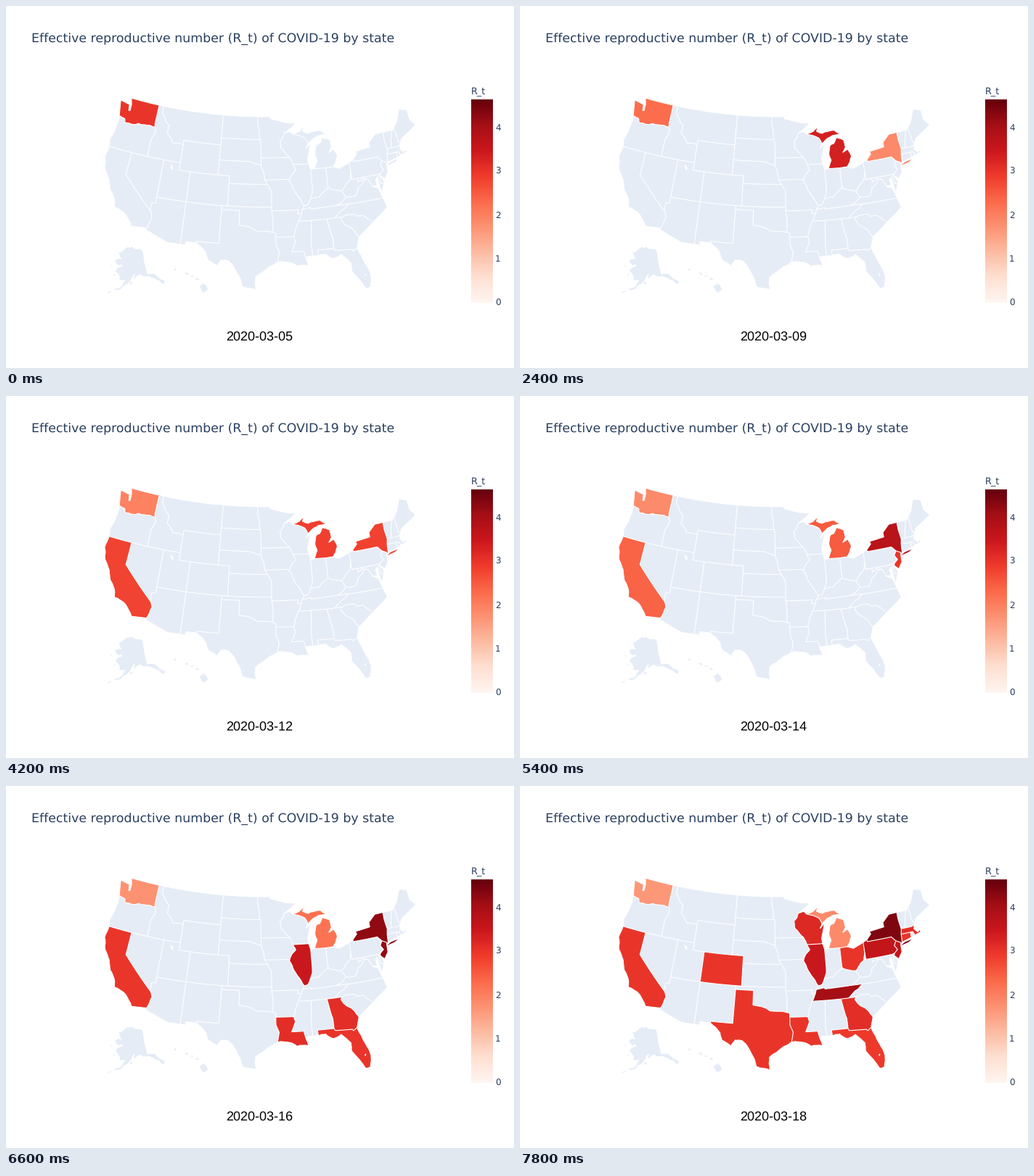
These frames come from a looping animation (700x500 px, 8 s). A matplotlib script:

```python
import random

import numpy as np
import matplotlib.pyplot as plt
from matplotlib.animation import FuncAnimation
from matplotlib.collections import LineCollection
from matplotlib.patches import Polygon

W, H, DPI = 700, 500, 100
PX = 72 / DPI
LAND, INK = "#E5ECF6", "#2a3f5f"
VMAX = 4.63
SCALE = 594
REDS = plt.get_cmap("Reds")
rng = random.Random(7)
plt.rcParams["text.hinting"] = "no_hinting"


def conic(meridian, center, parallels, scale, origin):
    """Albers equal-area projection to stage pixels; longitudes are degrees west."""
    s1, s2 = np.sin(np.radians(parallels))
    n = (s1 + s2) / 2
    c = 1 + s1 * s2

    def raw(lon, lat):
        rho = np.sqrt(c - 2 * n * np.sin(np.radians(lat))) / n
        turn = n * np.radians(meridian - lon)
        return np.array([rho * np.sin(turn), rho * np.cos(turn)])

    base = raw(*center)[:, None]
    start = np.array(origin)[:, None]
    return lambda lon, lat: (start + scale * (raw(lon, lat) - base)).T


MAIN = conic(96, (96.6, 38.7), (29.5, 45.5), SCALE, (350, 260))
ALASKA = conic(154, (156, 58.5), (55, 65), 0.35 * SCALE,
               (350 - 0.307 * SCALE, 260 + 0.201 * SCALE))
HAWAII = conic(157, (160, 19.9), (8, 18), SCALE,
               (350 - 0.205 * SCALE, 260 + 0.212 * SCALE))


def place(points, proj=MAIN, steps=6):
    """Project a path, subdividing so parallels come out curved."""
    p = np.array(points, float)
    t = np.arange((len(p) - 1) * steps + 1) / steps
    k = np.arange(len(p))
    return proj(np.interp(t, k, p[:, 0]), np.interp(t, k, p[:, 1]))


def wander(points, depth=2, amount=0.07):
    """Roughen a path by shifting the middle of each stretch sideways."""
    for _ in range(depth):
        out = points[:1]
        for (x0, y0), (x1, y1) in zip(points, points[1:]):
            d = rng.uniform(-amount, amount)
            out += [((x0 + x1) / 2 + d * (y1 - y0), (y0 + y1) / 2 - d * (x1 - x0)), (x1, y1)]
        points = out
    return points


arcs = []


def line(*v):
    """Surveyed border through the given lon, lat pairs."""
    arcs.append(list(zip(v[::2], v[1::2])))
    return arcs[-1]


def shore(*v):
    """River or coast through the given lon, lat pairs."""
    arcs.append(wander(list(zip(v[::2], v[1::2]))))
    return arcs[-1]


def ring(*parts):
    """Join arcs end to end, flipping those that run the other way."""
    pts = list(parts[0])
    if pts[-1] not in (parts[1][0], parts[1][-1]):
        pts.reverse()
    for part in parts[1:]:
        pts += part if part[0] == pts[-1] else part[::-1]
    return place(pts)


# Outer border, clockwise from the south-west
ca_coast = shore(117.12, 32.53, 118.4, 33.85, 120.5, 34.45, 120.65, 35.1, 121.9, 36.5,
                 122.5, 37.7, 123.75, 38.95, 124.4, 40.4, 124.21, 42)
or_coast = shore(124.21, 42, 124.5, 42.8, 123.95, 45.5, 124.07, 46.28)
wa_coast = line(124.07, 46.28, 124.7, 48.35, 122.8, 48.1, 122.6, 47.3, 122.35, 47.35,
                122.4, 48.2, 122.76, 49)
wa_north = line(122.76, 49, 117.03, 49)
north = line(117.03, 49, 97.23, 49)
mn_north = line(97.23, 49, 95.15, 49, 95.15, 49.38, 94.65, 48.74, 91.4, 48.1,
                89.6, 48, 90.8, 47.3, 92.02, 46.71)
wi_north = line(92.02, 46.71, 90.9, 46.95, 90.42, 46.57)
mi_upper = shore(90.42, 46.57, 87.9, 47.45, 88.45, 46.85, 87.4, 46.5, 85, 46.75,
                 83.95, 46.05, 85.5, 46.08, 86.65, 45.7, 87.6, 45.1)
wi_lake = line(87.6, 45.1, 88, 44.55, 87.1, 45.2, 87.9, 43.2, 87.8, 42.49)
il_lake = line(87.8, 42.49, 87.53, 41.71)
in_lake = line(87.53, 41.71, 86.82, 41.76)
mi_lake = shore(86.82, 41.76, 86.2, 42.8, 86.5, 43.7, 86.1, 44.8, 85.4, 45, 84.75, 45.77,
                83.45, 45.3, 83.3, 44.3, 83.9, 43.7, 82.95, 44.05, 82.45, 43, 83.45, 41.73)
oh_lake = line(83.45, 41.73, 82.4, 41.4, 80.52, 41.98)
pa_lake = line(80.52, 41.98, 79.76, 42.27)
ny_north = line(79.76, 42.27, 78.9, 42.9, 79.05, 43.27, 76.3, 43.5, 76.3, 44.1,
                74.9, 45, 73.34, 45.01)
new_england = line(73.34, 45.01, 71.5, 45.01, 71.08, 45.3, 70.3, 45.9, 69.2, 47.45,
                   67.79, 47.07, 67.79, 45.7, 66.97, 44.8, 70.2, 43.6, 70.82, 42.87)
ma_coast = line(70.82, 42.87, 71, 42.3, 70.5, 41.8, 70.1, 42.05, 69.95, 41.7, 71.12, 41.5)
ri_coast = line(71.12, 41.5, 71.86, 41.32)
ct_coast = line(71.86, 41.32, 73.66, 41)
harbor = line(73.66, 41, 74, 40.7)
nj_coast = line(74, 40.7, 74.1, 39.75, 74.9, 38.95, 75.55, 39.5)
atlantic = line(75.55, 39.5, 75.1, 38.6, 75.95, 37.15, 76.1, 39.4, 76.5, 39.1, 76.4, 38.3,
                77.25, 38.35, 76.3, 37.9, 76, 36.9, 75.5, 35.25, 76.5, 34.65,
                77.95, 33.87, 80.9, 32.04)
ga_coast = line(80.9, 32.04, 81.44, 30.71)
fl_coast = shore(81.44, 30.71, 80.55, 28.4, 80.03, 26.8, 80.4, 25.2, 81.1, 25.13,
                 82.75, 27.7, 82.7, 28.8, 84, 30.1, 85.2, 29.65, 86.4, 30.38, 87.52, 30.28)
gulf = shore(87.52, 30.28, 89.52, 30.18)
la_coast = shore(89.52, 30.18, 89.1, 29, 90.9, 29.05, 92, 29.6, 93.84, 29.7)
tx_coast = shore(93.84, 29.7, 95.1, 29.1, 97.2, 27.7, 97.14, 25.97)
rio = shore(97.14, 25.97, 99.1, 26.42, 99.5, 27.5, 101.4, 29.77, 102.5, 29.8,
            103.1, 28.98, 104.5, 29.65, 104.9, 30.6, 106.53, 31.78)
mexico = line(106.53, 31.78, 108.21, 31.78, 108.21, 31.33, 111.07, 31.33,
              114.81, 32.5, 114.72, 32.72)
ca_south = line(114.72, 32.72, 117.12, 32.53)
outline = list(arcs)

# Borders that follow a parallel or a meridian
for lat, west, east in [(42, 120, 111.05), (45, 111.05, 104.05), (41, 111.05, 109.05),
                        (45.94, 104.05, 96.56), (43.5, 96.45, 91.22), (40, 102.05, 95.31),
                        (37, 114.05, 109.05), (37, 102.04, 94.62), (36.56, 81.68, 75.87)]:
    line(west, lat, east, lat)
for lon, top, low in [(111.05, 45, 41), (109.05, 37, 31.33), (104.05, 49, 41), (103, 37, 36.5)]:
    line(lon, top, lon, low)

# West and plains
wa_or = shore(124.07, 46.28, 122.9, 46.1, 122.6, 45.6, 121.2, 45.65, 119, 46, 116.92, 46)
wa_id = line(116.92, 46, 117.04, 46.4, 117.03, 49)
shore(116.92, 46, 116.6, 45.5, 117.1, 44.3, 117.03, 42)
shore(116.05, 49, 116.05, 48, 114.35, 46.65, 114.4, 45.56, 113, 44.4, 111.05, 44.47)
line(114.04, 42, 114.05, 36.2, 114.7, 36.1, 114.63, 35)
ca_or = line(124.21, 42, 120, 42)
ca_nv = line(120, 42, 120, 39, 114.63, 35)
ca_az = shore(114.63, 35, 114.2, 34.3, 114.5, 33.2, 114.72, 32.72)
shore(97.23, 49, 96.8, 46.9, 96.5, 45.5)
line(96.5, 45.5, 96.45, 43.5, 96.44, 42.49)
line(104.05, 43, 98.5, 43, 96.44, 42.49)
shore(96.44, 42.49, 95.77, 40.58, 94.61, 39.11)
co_ut = line(109.05, 37, 109.05, 41)
co_wy = line(109.05, 41, 104.05, 41)
co_ne = line(104.05, 41, 102.05, 41, 102.05, 40)
co_ks = line(102.05, 40, 102.04, 37)
co_nm = line(102.04, 37, 109.05, 37)
nm_tx = line(103, 36.5, 103.06, 32, 106.62, 32, 106.53, 31.78)
ok_panhandle = line(103, 36.5, 100, 36.5, 100, 34.56)
red_river = shore(100, 34.56, 97.2, 33.85, 94.48, 33.64)
tx_ar = line(94.48, 33.64, 94.05, 33.55, 94.04, 33.02)
tx_la = line(94.04, 33.02, 94.04, 31.99, 93.55, 31, 93.84, 29.7)

# Mississippi basin
ar_la = line(94.04, 33.02, 91.17, 33)
la_ms = line(91.17, 33, 90.95, 32.3, 91.6, 31, 89.73, 31, 89.52, 30.18)
shore(91.17, 33, 90.3, 35)
ar_tn = shore(90.3, 35, 89.7, 36)
line(89.7, 36, 90.37, 36, 90.15, 36.5, 94.62, 36.5, 94.43, 35.4, 94.48, 33.64)
line(94.61, 39.11, 94.62, 36.5)
mo_tn = line(89.7, 36, 89.53, 36.5)
line(89.53, 36.5, 89.13, 36.98)
mo_il = shore(89.13, 36.98, 90.2, 38.4, 90.7, 39.1, 91.42, 40.38)
line(95.77, 40.58, 91.73, 40.61, 91.42, 40.38)
il_ia = shore(91.42, 40.38, 91, 41.2, 90.2, 41.8, 90.64, 42.51)
il_wi = line(90.64, 42.51, 87.8, 42.49)
ia_wi = shore(90.64, 42.51, 91.22, 43.5)
mn_wi = shore(91.22, 43.5, 92.75, 44.75, 92.87, 45.7, 92.29, 46.1, 92.02, 46.71)
wi_mi = shore(90.42, 46.57, 88.1, 45.92, 87.6, 45.1)
il_in = line(87.53, 41.71, 87.53, 39.35, 87.6, 38.6, 88.05, 37.8)
il_ky = shore(88.05, 37.8, 88.5, 37.1, 89.13, 36.98)
shore(88.05, 37.8, 86.5, 37.95, 85.4, 38.73, 84.82, 39.1)
in_oh = line(84.82, 39.1, 84.81, 41.7)
mi_oh = line(83.45, 41.73, 84.81, 41.7)
mi_in = line(84.81, 41.7, 86.82, 41.76)
oh_ky = shore(84.82, 39.1, 83.7, 38.65, 82.59, 38.42)
oh_wv = shore(82.59, 38.42, 81.75, 39.1, 80.85, 39.7, 80.52, 40.64)
oh_pa = line(80.52, 40.64, 80.52, 41.98)

# South-east
shore(82.59, 38.42, 81.97, 37.54, 83.68, 36.6)
tn_ky = line(83.68, 36.6, 88.07, 36.5, 88.07, 36.68, 89.53, 36.5)
tn_va = line(83.68, 36.6, 81.68, 36.59)
tn_nc = shore(81.68, 36.59, 82.6, 36, 84.32, 34.99)
tn_ga = line(84.32, 34.99, 85.6, 34.98)
tn_south = line(85.6, 34.98, 90.3, 35)
nc_ga = line(84.32, 34.99, 83.11, 35)
line(83.11, 35, 82.3, 35.2, 81.05, 35.15, 80.78, 34.82, 79.67, 34.8, 78.55, 33.86)
sc_ga = shore(83.11, 35, 83.35, 34.7, 81.5, 33, 80.9, 32.04)
ga_fl = line(81.44, 30.71, 82.05, 30.36, 82.2, 30.57, 84.86, 30.7, 85, 31)
fl_al = line(85, 31, 87.6, 31, 87.52, 30.28)
ga_al = line(85, 31, 85, 32.3, 85.18, 32.87, 85.6, 34.98)
line(88.2, 35, 88.47, 31.9, 88.4, 30.37)

# Atlantic and New England
pa_wv = line(79.48, 39.72, 80.52, 39.72, 80.52, 40.64)
pa_md = line(75.79, 39.72, 79.48, 39.72)
pa_de = line(75.42, 39.8, 75.79, 39.72)
nj_de = line(75.55, 39.5, 75.42, 39.8)
nj_pa = line(75.42, 39.8, 74.75, 40.2, 75.15, 40.8, 74.69, 41.36)
ny_nj = line(74, 40.7, 73.9, 41, 74.69, 41.36)
ny_pa = line(74.69, 41.36, 75.35, 42, 79.76, 42, 79.76, 42.27)
ny_vt = line(73.34, 45.01, 73.4, 44, 73.26, 42.75)
ny_ma = line(73.26, 42.75, 73.5, 42.05)
ny_ct = line(73.5, 42.05, 73.66, 41)
ma_north = line(70.82, 42.87, 71.3, 42.7, 73.26, 42.75)
ma_ri = line(71.12, 41.5, 71.38, 42.02, 71.8, 42.02)
ma_ct = line(71.8, 42.02, 73.5, 42.05)
ct_ri = line(71.8, 42.02, 71.86, 41.32)
shore(71.5, 45.01, 72.05, 44.1, 72.46, 42.73)
line(71.08, 45.3, 70.95, 43.35, 70.7, 43.07)
line(75.79, 39.72, 75.7, 38.46, 75.05, 38.45)
shore(77.25, 38.35, 77.72, 39.32, 78.6, 39.6, 79.48, 39.2, 79.48, 39.72)
shore(77.72, 39.32, 78.35, 39.4, 79.65, 38.5, 80.3, 37.5, 81.97, 37.54)

fig = plt.figure(figsize=(W / DPI, H / DPI), dpi=DPI, facecolor="white")
ax = fig.add_axes([0, 0, 1, 1])
ax.axis("off")


def fill(xy, color=LAND, z=1):
    return ax.add_patch(Polygon(xy, facecolor=color, linewidth=0, zorder=z))


def blob(lon, lat, dx, dy, proj=MAIN, tilt=0.0, color=LAND, z=1):
    """Small island or lake: a roughened, slanted diamond."""
    turns = np.arange(5) * np.pi / 2
    pts = [(lon + dx * np.cos(a), lat + dy * np.sin(a) + tilt * np.cos(a)) for a in turns]
    return fill(place(wander(pts, 2, 0.2), proj), color, z)


fill(ring(*outline))
long_island = place([(74, 40.6), (73.2, 40.92), (71.9, 41.07), (72.5, 40.82), (74, 40.6)])
fill(long_island)

alaska = [(141, 69.65), (148, 70.4), (156.6, 71.35), (166.2, 68.88), (161.8, 66.3),
          (168, 65.65), (166, 64.5), (161.2, 64.5), (161, 63.6), (164.5, 63.1), (166, 61.7),
          (162, 59.9), (161.9, 58.65), (157.4, 58.7), (160.5, 56), (164.8, 54.65),
          (156.5, 57.2), (151.8, 60.8), (150.2, 61.2), (151.7, 59.3), (146.5, 60.8),
          (139.8, 59.55), (136.5, 58.2), (131.5, 55), (130.1, 56.1), (135.5, 59.8),
          (139.1, 60.3), (141, 60.3), (141, 69.65)]
fill(place(wander(alaska, 2, 0.1), ALASKA))
for lon, lat, dx, dy, tilt in [(153.4, 57.6, 1, 0.5, -0.4), (167.5, 53.3, 1.3, 0.2, -0.5),
                               (166.5, 60.1, 0.8, 0.3, 0), (170.3, 63.4, 1.4, 0.2, 0)]:
    blob(lon, lat, dx, dy, ALASKA, tilt)
for lon, lat, dx, dy, tilt in [(155.5, 19.6, 0.6, 0.65, 0.1), (156.4, 20.8, 0.35, 0.15, 0.1),
                               (157.05, 21.13, 0.3, 0.07, 0), (157.95, 21.5, 0.3, 0.15, 0.1),
                               (159.55, 22.05, 0.22, 0.18, 0)]:
    blob(lon, lat, dx, dy, HAWAII, tilt)

# Each state: its shapes and a rule for R_t by day, or None before the first case count
tracks = []


def track(rule, *shapes):
    tracks.append((rule, [fill(s, z=2) for s in shapes]))


def keys(*pairs):
    """Straight runs between (day, value) pairs, starting on the first day."""
    days, values = zip(*pairs)
    return lambda day: np.interp(day, days, values) if day >= days[0] else None


def fresh(start, peak=3.0, last=3.0):
    """Begin at 3, reach the peak on day 12 and the last value on day 13."""
    if start < 12:
        return keys((start, 3), (12, peak), (13, last))
    return keys((start, 3), (13, last))


track(lambda day: 1.5 + 1.5 * np.exp(-day / 6), ring(wa_coast, wa_north, wa_id, wa_or))
track(keys((3, 3.5), (13, 1.85)), ring(mi_upper, wi_mi), ring(mi_lake, mi_oh, mi_in))
track(keys((2, 2.6), (4, 1.85), (6, 2.35), (9, 3.75), (10, 3.85), (12, 4.62), (13, 4.4)),
      ring(ny_north, ny_vt, ny_ma, ny_ct, harbor, ny_nj, ny_pa), long_island)
track(keys((6, 3), (9, 2.4), (12, 3.25), (13, 3)),
      ring(ca_coast, ca_or, ca_nv, ca_az, ca_south))
track(keys((9, 3), (10, 4.5), (13, 3.6)), ring(ny_nj, nj_coast, nj_de, nj_pa))
track(fresh(10, 4, 3.5), ring(il_wi, il_ia, mo_il, il_ky, il_in, il_lake))
track(fresh(10, 3.2, 3.1), ring(tn_ga, ga_al, ga_fl, ga_coast, sc_ga, nc_ga))
track(fresh(10, 3.2), ring(ar_la, la_ms, la_coast, tx_la))
track(fresh(10, 3, 2.92), ring(ga_fl, fl_al, fl_coast))
track(fresh(12), ring(co_ut, co_wy, co_ne, co_ks, co_nm))
track(fresh(12, last=3.2), ring(mn_wi, wi_north, wi_mi, wi_lake, il_wi, ia_wi))
track(fresh(12, last=3.6), ring(oh_pa, pa_lake, ny_pa, nj_pa, pa_de, pa_md, pa_wv))
track(fresh(12, last=4.05), ring(tn_ky, mo_tn, ar_tn, tn_south, tn_ga, tn_nc, tn_va))
track(fresh(12, last=3.1), ring(ma_north, ma_coast, ma_ri, ma_ct, ny_ma))
track(fresh(13), ring(nm_tx, ok_panhandle, red_river, tx_ar, tx_la, tx_coast, rio))
track(fresh(13), ring(mi_oh, oh_lake, oh_pa, oh_wv, oh_ky, in_oh))
track(fresh(13), ring(ma_ct, ct_ri, ct_coast, ny_ct))

ax.add_collection(LineCollection([place(a) for a in arcs], colors="white",
                                 linewidths=1.1 * PX, zorder=3))
blob(112.45, 41.2, 0.4, 0.25, tilt=0.25, color="white", z=4)
blob(80.83, 26.95, 0.15, 0.15, color="white", z=4)


def label(x, y, s, size, color=INK, font="DejaVu Sans", ha="left"):
    return ax.text(x, y, s, fontsize=size * PX, color=color, family=font, ha=ha,
                   va="baseline", zorder=5)


label(35, 50, "Effective reproductive number (R_t) of COVID-19 by state", 17.4)
label(641, 122, "R_t", 12.7)
ax.imshow(np.linspace(1, 0, 281)[:, None], cmap=REDS, vmin=0, vmax=1, aspect="auto",
          extent=(641, 671, 410, 129), interpolation="nearest")
for v in range(5):
    label(674, 409.5 - 60.6 * v + 4.4, str(v), 12)
date = label(349.6, 462, "", 18, "black", "Liberation Sans", "center")
ax.set_xlim(0, W)
ax.set_ylim(H, 0)


def draw(i):
    day = i // 3
    date.set_text(f"2020-03-{5 + day:02d}")
    for rule, patches in tracks:
        value = rule(day)
        for p in patches:
            p.set_facecolor(LAND if value is None else REDS(value / VMAX))
    return []


anim = FuncAnimation(fig, draw, frames=40, interval=200, repeat=True)
plt.show()
```
